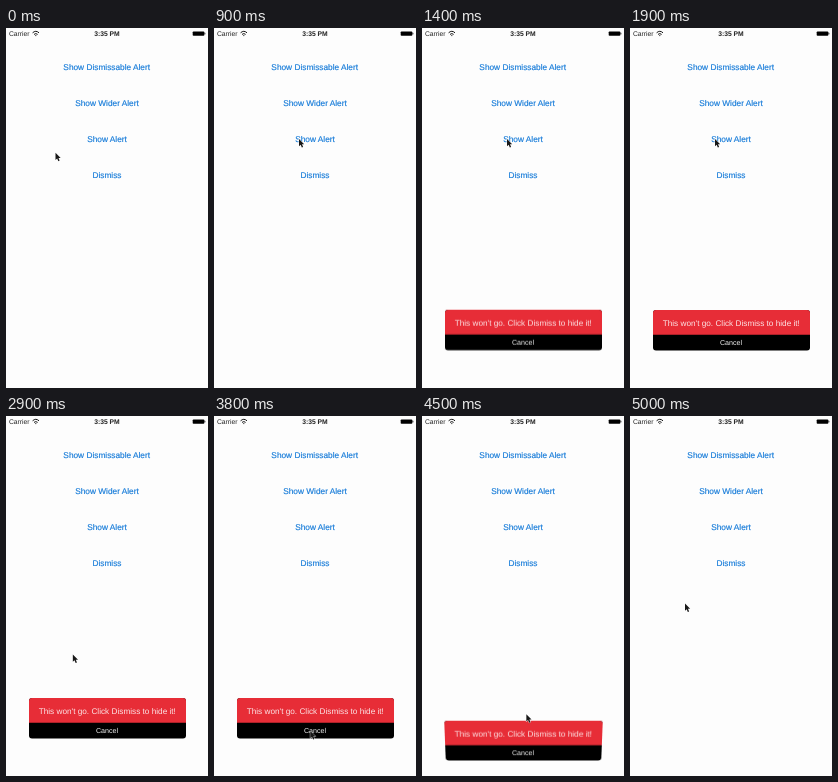
An HTML page that plays this animation: 202x360 px, repeating every 5100 ms.

```html
<!DOCTYPE html>
<html lang="en">
<head>
<meta charset="utf-8">
<title>Alert demo</title>
<style>
html, body { margin: 0; width: 100%; height: 100%; overflow: hidden; background: #fdfdfd; }
#stage { position: absolute; left: 0; top: 0; width: 202px; height: 360px; overflow: hidden; background: #fdfdfd; }
svg { position: absolute; display: block; }
#screen { left: 0; top: 0; }
#alert { left: 23px; top: 282px; }
#cursor { left: 0; top: 0; overflow: visible; }
text { font-family: "Liberation Sans", Arial, sans-serif; text-anchor: middle; text-rendering: geometricPrecision; }
.link { font-size: 8.3px; fill: #1279d8; stroke: #1279d8; stroke-width: 0.15px; }
.status { font-size: 6.75px; fill: #222; }
</style>
</head>
<body>
<div id="stage">
  <svg id="screen" width="202" height="360">
    <text class="status" x="13.3" y="7.8">Carrier</text>
    <g fill="none" stroke="#111" stroke-width="1">
      <path d="M26.6 4.8Q29.8 1.8 33 4.8M28 6.4Q29.8 4.8 31.6 6.4"/>
      <path d="M29.8 7.1v1"/>
    </g>
    <text class="status" x="101" y="7.9" font-weight="bold">3:35 PM</text>
    <rect x="186.7" y="3.4" width="11.6" height="4.4" rx="0.8" fill="#000"/>
    <rect x="198.5" y="4.8" width="0.8" height="1.6" fill="#000"/>
    <text class="link" x="100.7" y="42">Show Dismissable Alert</text>
    <text class="link" x="101" y="78">Show Wider Alert</text>
    <text class="link" x="101" y="114" id="show">Show Alert</text>
    <text class="link" x="101" y="150">Dismiss</text>
  </svg>
  <svg id="alert" width="157" height="40.5">
    <rect width="157" height="40.5" rx="3" fill="#000"/>
    <path d="M0 24.8V3Q0 0 3 0H154Q157 0 157 3V24.8Z" fill="#e72d37"/>
    <text x="78.3" y="15.9" font-size="8.22" fill="#fff" fill-opacity="0.87">This won't go. Click Dismiss to hide it!</text>
    <text x="78" y="35.4" font-size="7.1" fill="#f2f2f2">Cancel</text>
  </svg>
  <svg id="cursor" width="8" height="12">
    <path transform="scale(0.88)" d="M0 0V8.3L1.9 6.6 3.2 9.6 4.7 9 3.4 6H5.9Z" fill="#181818" stroke="#fff" stroke-width="0.9" paint-order="stroke"/>
  </svg>
</div>
<script>
const LOOP = 5100, STEP = 100;
const PRESS = 1000, DISMISS = 4400;
const $ = id => document.getElementById(id);
const show = $("show"), card = $("alert"), cursor = $("cursor");

const smooth = p => p * p * (3 - 2 * p);
const speedUp = p => p * p;

// Pointer strokes: curves through a start, a bend and an end
const strokes = [
  { from: 0, to: 600, ease: smooth, path: [[49.5, 124.7], [67, 118], [85, 111]] },
  { from: 2400, to: 3400, ease: smooth, path: [[85, 111], [43, 264], [96.3, 315]] },
  { from: 4200, to: 5000, ease: speedUp, path: [[96.3, 315], [133, 256], [55, 187.5]] }
];

function pointer(t) {
  const { from, to, ease, path: [a, b, c] } = strokes.findLast(s => s.from <= t);
  const u = ease(Math.min((t - from) / (to - from), 1)), v = 1 - u;
  return [0, 1].map(i => v * v * a[i] + 2 * u * v * b[i] + u * u * c[i]);
}

// Springs up into place, later falls away
function alertOffset(t) {
  const fall = (t - DISMISS) / 100, rise = (t - PRESS) / 100;
  if (fall > 0) return 22.6 * fall * fall;
  return rise < 6 ? 80 * Math.exp(-0.926 * rise) * Math.cos(1.148 * rise) : 0;
}

function draw(t) {
  const [x, y] = pointer(t), dy = alertOffset(t);
  const tilt = -12 * Math.tanh(dy / 6);
  cursor.style.transform = `translate(${x}px, ${y}px)`;
  card.style.visibility = t > PRESS && dy < 80 ? "visible" : "hidden";
  card.style.transform = dy ? `translateY(${dy}px) perspective(420px) rotateX(${tilt}deg)` : "none";
  show.style.opacity = t < PRESS ? 1 : Math.min(1, 0.25 + (t - PRESS) / 500);
}

const start = performance.now();
function tick() {
  const t = (performance.now() - start) % LOOP;
  draw(Math.floor(t / STEP) * STEP);
  requestAnimationFrame(tick);
}
tick();
</script>
</body>
</html>
```
